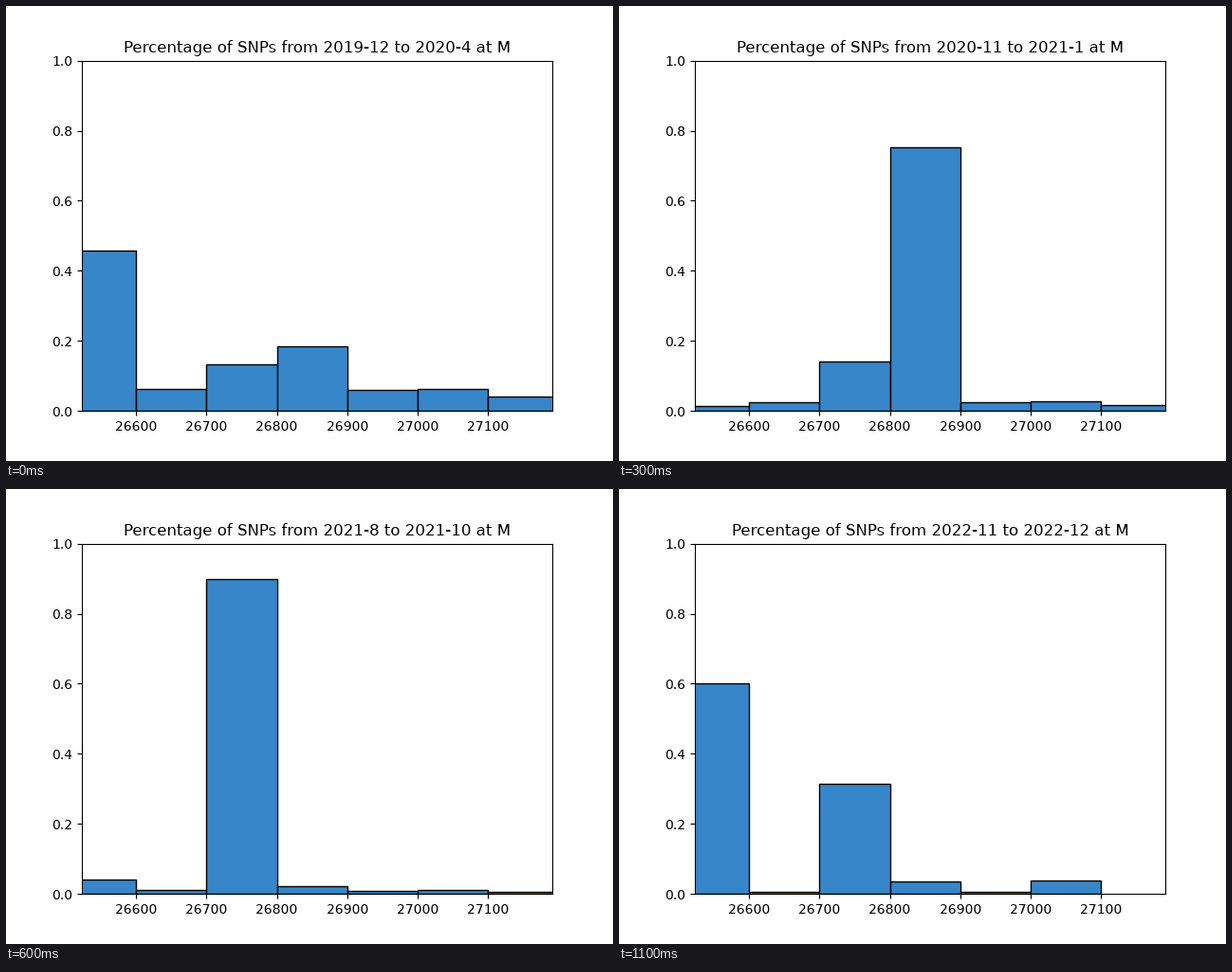
A matplotlib script that plays this animation: 640x480 px, repeating every 1.2 s.

```python
import numpy as np
import matplotlib.pyplot as plt
from matplotlib.animation import FuncAnimation

FRAMES = 12
BIN = 100
FIRST, LAST = 2019 * 12 + 11, 2022 * 12 + 11  # months counted from year 0

# Turning points (quarter, share) of the three dominant bins.
PEAKS = {
    0: [(0, .457), (2, 0), (3, .014), (6, .04), (7, .43), (8, .58),
        (9, .566), (11, .6)],
    2: [(0, .132), (2, 1), (3, .141), (5, .836), (6, .9), (7, .527),
        (8, .34), (11, .314)],
    3: [(0, .184), (2, 0), (3, .752), (5, .028), (7, .014), (9, .081),
        (11, .036)],
}
MINOR = [1, 4, 5, 6]
EARLY = np.array([.28, .26, .28, .18])
LATE = np.array([.12, .12, .76, 0])


def shares(i):
    """Bin heights for one quarter; the minor bins split what is left."""
    out = np.zeros(7)
    for k, points in PEAKS.items():
        out[k] = np.interp(i, *zip(*points))
    drift = (i / (FRAMES - 1)) ** 4
    out[MINOR] = (1 - out.sum()) * (EARLY + (LATE - EARLY) * drift)
    return out


def label(month):
    return f"{month // 12}-{month % 12 + 1}"


def title(i):
    end = FIRST + 4 + 3 * i
    start = end - 2 if i else FIRST
    return (f"Percentage of SNPs from {label(start)} "
            f"to {label(min(end, LAST))} at M")


plt.rcParams["font.family"] = "DejaVu Sans"
plt.rcParams["text.hinting"] = "native"
fig, ax = plt.subplots(figsize=(6.4, 4.8), dpi=100)
bars = ax.bar(np.arange(26500, 27200, BIN), shares(0), width=BIN,
              align="edge", color="#3786c9", edgecolor="black", linewidth=1)
ax.set_xlim(26523, 27191)
ax.set_ylim(0, 1)
ax.set_xticks(range(26600, 27101, BIN))
heading = ax.set_title(title(0))


def update(i):
    heights = shares(i)
    top = np.flatnonzero(heights)[-1]  # bins end at the last filled one
    for k, (bar, h) in enumerate(zip(bars, heights)):
        bar.set_height(h)
        bar.set_visible(bool(k <= top))
    heading.set_text(title(i))
    return [*bars, heading]


anim = FuncAnimation(fig, update, frames=FRAMES, interval=100,
                     repeat=True, repeat_delay=0, blit=False)
plt.show()
```
